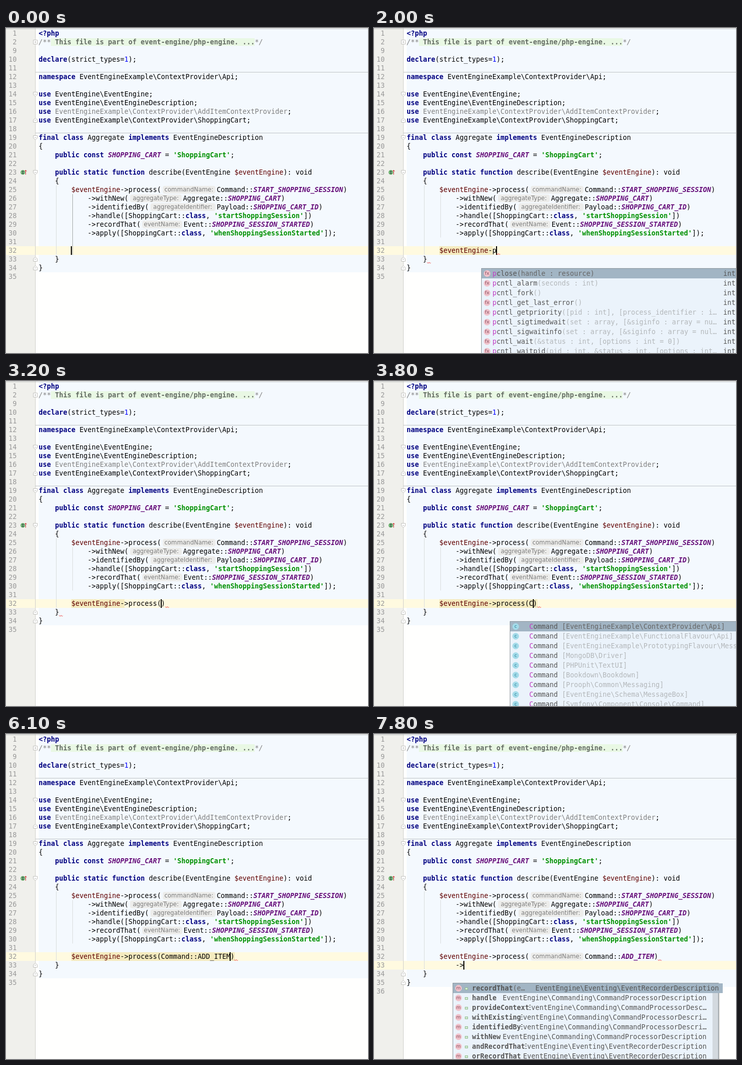
These frames come from a looping animation (709x636 px, 8000 ms). An HTML page:

```html
<!DOCTYPE html>
<html>
<head>
<meta charset="utf-8">
<style>
html, body { margin: 0; width: 100%; height: 100%; overflow: hidden; background: #fffffe; }
#stage { position: relative; width: 709px; height: 636px; overflow: hidden;
  font: 13.288px/17px "DejaVu Sans Mono", monospace; color: #000; white-space: pre; }
#stage div, #stage svg { position: absolute; }
#stage b { color: #000080; }
#stage i { color: #660e7a; font-weight: bold; }
#stage u { color: #600000; text-decoration: none; }
#stage s { color: #009000; font-weight: bold; text-decoration: none; }
#stage em { color: #808080; font-style: normal; }
#stage em.c { font-style: italic; }
#stage strong { color: #636b63; background: #e9f8e4; }
#stage kbd { display: inline-block; vertical-align: top; height: 15px; margin: 1px 3px 0;
  font: 11.6px/15px "DejaVu Sans", sans-serif; color: #7b7b7b; background: #ededeb;
  border-radius: 4px; text-align: center; }
.num { width: 21px; text-align: right; color: #999; }
.caret { position: absolute; top: 0; width: 2px; height: 17px; margin-left: -1px; background: #000; }
#stage .wave { top: 14px; overflow: visible; }
.popup { box-sizing: border-box; border: 1px solid #8d979e; background: #ebf3fb; color: #555;
  box-shadow: 1px 1px 2px #0005; }
.row { left: 0; height: 19px; background: #ebf3fb; }
.row.sel { background: #a2b5c4; }
.row span { position: absolute; top: 1px; line-height: 18px; }
.row .label { background: inherit; }
.row .bold { font-weight: bold; }
.row .args { position: static; color: #b3b7ba; font-weight: normal; }
.row.sel .args { color: #666; }
.row .hit { position: static; color: #c03fc4; }
.row .icon { left: 4px; top: 3px; width: 13px; height: 13px; border-radius: 50%;
  font: 9px/12px "DejaVu Sans", sans-serif; text-align: center; color: #87505f; background: #f1c2cb; }
.row .icon.c { color: #207d96; background: #a4dbe9; }
.row .lock { left: 23px; top: 8px; width: 4px; height: 3px; border: 1px solid #8fbc8f; background: #d5ead2; }
.bar { right: 0; top: 0; width: 11px; height: 100%; background: #d3d9de; }
</style>
</head>
<body>
<div id="stage"></div>
<script>
const stage = document.getElementById('stage');
const LOOP = 8000, LINE = 17;

const code = String.raw`<b>&lt;?php</b>
<em class="c">/**</em><strong> This file is part of event-engine/php-engine. ...</strong><em class="c">*/</em>

<b>declare</b>(strict_types=<span style="color:#00f">1</span>);

<b>namespace</b> EventEngineExample\ContextProvider\Api;

<b>use</b> EventEngine\EventEngine;
<b>use</b> EventEngine\EventEngineDescription;
<b>use</b> <em>EventEngineExample\ContextProvider\AddItemContextProvider</em>;
<b>use</b> EventEngineExample\ContextProvider\ShoppingCart;

<b>final class</b> Aggregate <b>implements</b> EventEngineDescription
{
    <b>public const</b> <i>SHOPPING_CART</i> = <s>'ShoppingCart'</s>;

    <b>public static function</b> describe(EventEngine <u>$eventEngine</u>): void
    {
        <u>$eventEngine</u>->process(<kbd style="width:103px">commandName:</kbd>Command::<i>START_SHOPPING_SESSION</i>)
            ->withNew(<kbd style="width:101px">aggregateType:</kbd>Aggregate::<i>SHOPPING_CART</i>)
            ->identifiedBy(<kbd style="width:127px">aggregateIdentifier:</kbd>Payload::<i>SHOPPING_CART_ID</i>)
            ->handle([ShoppingCart::<b>class</b>, <s>'startShoppingSession'</s>])
            ->recordThat(<kbd style="width:78px">eventName:</kbd>Event::<i>SHOPPING_SESSION_STARTED</i>)
            ->apply([ShoppingCart::<b>class</b>, <s>'whenShoppingSessionStarted'</s>]);
`.split('\n');

// Rows are name~arguments~type; a leading + adds the visibility mark.
const rows = text => text.trim().split('\n');
const commands = rows(String.raw`
Command~ [EventEngineExample\ContextProvider\Api]
Command~ [EventEngineExample\FunctionalFlavour\Api]
Command~ [EventEngineExample\PrototypingFlavour\Messaging]
Command~ [MongoDB\Driver]
Command~ [PHPUnit\TextUI]
Command~ [Bookdown\Bookdown]
Command~ [Prooph\Common\Messaging]
Command~ [EventEngine\Schema\MessageBox]
Command~ [Symfony\Component\Console\Command]`);

const lists = {
  vars: { x: 114, w: 520, end: 498, icon: 'v', bar: true, rows: rows(String.raw`
eventEngine~~EventEngine\EventEngine
_COOKIE~~array
_ENV~~array
_FILES~~array
_GET~~array
_POST~~array
_REQUEST~~array
_SERVER~~array
_SESSION~~array`) },
  funcs: { x: 210, w: 520, end: 498, icon: 'fx', rows: rows(`
pclose~(handle : resource)~int
pcntl_alarm~(seconds : int)~int
pcntl_fork~()~int
pcntl_get_last_error~()~int
pcntl_getpriority~([pid : int], [process_identifier : i…~int
pcntl_sigtimedwait~(set : array, [&siginfo : array = nu…~int
pcntl_sigwaitinfo~(set : array, [&siginfo : array = nul…~int
pcntl_wait~(&status : int, [options : int = 0])~int
pcntl_waitpid~(pid : int, &status : int, [options : int…~int`) },
  methods: { x: 218, w: 520, end: 490, icon: 'm', rows: rows(String.raw`
+process~~EventEngine\Commanding\CommandProcessorDescriptio
projectionInfo~()~EventEngine\Projecting\ProjectionInfoLis
preProcess~(commandName : string, p…~EventEngine\EventEngin
passToController~(commandName : str…~EventEngine\EventEngin
produce~~array|EventEngine\Messaging\CommandDispatchResult|
projectionVersion~(projectionName : string)~strin
+disableAutoProjecting~()~EventEngine\EventEngin
+runAllProjections~(sourceStream : string, ...events : ~voi
deleteAllProjections~()~voi`) },
  classes: { x: 266, w: 520, icon: 'c', text: 38, rows: commands },
  classesCom: { x: 266, w: 520, icon: 'c', text: 38, rows: ['COM', ...commands] },
  consts: { x: 338, w: 520, end: 370, icon: 'f', rows: rows(`
+class~~string
+START_SHOPPING_SESSION~~Command
+ADD_ITEM~~Command
+REMOVE_ITEM~~Command`) },
  chain: { x: 154, w: 521, end: 498, icon: 'm', text: 38, bar: true, rows: rows(String.raw`
+recordThat~(e…~EventEngine\Eventing\EventRecorderDescription
+handle~~EventEngine\Commanding\CommandProcessorDescription
+provideContext~~EventEngine\Commanding\CommandProcessorDesc…
+withExisting~~EventEngine\Commanding\CommandProcessorDescri…
+identifiedBy~~EventEngine\Commanding\CommandProcessorDescri…
+withNew~~EventEngine\Commanding\CommandProcessorDescription
+andRecordThat~~EventEngine\Eventing\EventRecorderDescription
+orRecordThat~~EventEngine\Eventing\EventRecorderDescription`) }
};

// time, typed text (| caret, ~ error wave), popup, prefix, selected row
const V = '$eventEngine', P = V + '->process(';
const HINTED = P + '<kbd style="width:103px">commandName:</kbd>Command::<i>ADD_ITEM</i>';
const steps = [
  [0, '|'], [400, ''], [600, '$|'],
  [800, '$|', 'vars', '', 0], [1000, '$|', 'vars', '', 0],
  [1200, V + '|'], [1500, V + '-|~'], [1900, V + '-p|~'],
  [2000, V + '-p|~', 'funcs', 'p', 0],
  [2300, V + '-|~'], [2500, V + '->|~'],
  [2600, V + '->p|~', 'methods', 'p', 0],
  [2800, V + '->pr|~', 'methods', 'pr', 0],
  [2900, V + '->pro|~', 'methods', 'pro', 0],
  [3000, V + '->proc|~', 'methods', 'proc', 0],
  [3200, P + '|)~'], [3400, P + '|)~'], [3700, P + 'C|)~'],
  [3800, P + 'C|)~', 'classes', 'c', 0],
  [3900, P + 'Co|)~', 'classes', 'co', 0],
  [4100, P + 'Com|)~', 'classes', 'com', 0],
  [4300, P + 'Com|)~', 'classesCom', 'com', 0],
  [4900, P + 'Com)~', 'classesCom', 'com', 1],
  [5000, P + 'Com|)~'],
  [5200, P + 'Command::|)~', 'consts', '', 0],
  [5800, P + 'Command::|)~', 'consts', '', 1],
  [5900, P + 'Command::|)~', 'consts', '', 2],
  [6100, P + 'Command::ADD_ITEM|)~'],
  [6300, HINTED + '|)~'], [6500, HINTED + ')|~'],
  [6600, '|'], [7100, '-|'],
  [7300, '->|', 'chain', '', 0], [7600, '->|', 'chain', '', 0], [7800, '->|', 'chain', '', 0]
];

const box = (x, y, w, h, color) =>
  `<div style="left:${x}px;top:${y}px;width:${w}px;height:${h}px;background:${color}"></div>`;
const rowY = i => 2 + LINE * i;
const line = (i, html) => `<div style="left:64px;top:${rowY(i)}px">${html}</div>`;
const WAVE = '<svg class="wave" width="8" height="3"><path d="M0 .5l2 2 2-2 2 2 1-1" fill="none" stroke="#e33"/></svg>';
const marks = s => s.replace(V, '<u>$&</u>').replace('|', '<span class="caret"></span>').replace('~', WAVE);

function foldMark(i, kind) {
  const y = rowY(i) + 8.5;
  const d = kind ? `M53.5 ${y - 4 * kind}h8v${5 * kind}l-4 ${3 * kind}l-4 ${-3 * kind}z`
                 : `M53.5 ${y - 4}h8v8h-8z`;
  const sign = kind < 0 || kind > 0 ? `M55.5 ${y}h4` : `M55.5 ${y}h4m-2-2v4`;
  return `<path d="${d}" fill="#fff"/><path d="${sign}"/>`;
}

function gutterArt(shift) {
  const folds = [[1, 0], [7, 1], [10, -1], [12, 1], [16, 1], [26 + shift, -1], [27 + shift, -1]];
  return `<svg width="64" height="636" fill="none" stroke="#c2c2be">
    ${folds.map(f => foldMark(...f)).join('')}
    <circle cx="33" cy="282.5" r="4" fill="#7fbf7f" stroke="#4f9a55"/>
    <path d="M31.5 280.5h3m-1.5 0v4m-1.5 0h3" stroke="#234"/>
    <path d="M38.5 287v-9m-2 2.5l2-2.5 2 2.5" stroke="#c33"/></svg>`;
}

function labelHtml(name, prefix) {
  const at = name.toLowerCase().indexOf(prefix), end = at + prefix.length;
  return name.slice(0, at) + `<span class="hit">${name.slice(at, end)}</span>` + name.slice(end);
}

function popupHtml(t, key, prefix, sel) {
  const p = lists[key], chain = key == 'chain';
  const shown = p.rows.filter(r => r.split('~')[0].toLowerCase().includes(prefix));
  const items = shown.map((r, i) => {
    const lock = r[0] == '+', on = i == sel, wide = chain && on && t >= 7800;
    const [name, args = '', type = ''] = r.slice(lock).split('~');
    const left = p.text || (lock ? 38 : 22);
    const typeX = p.end - type.length * 8 + (wide ? 24 : 0);
    const width = wide ? 528 : p.w - 2 - (p.bar ? 11 : 0);
    return `<div class="row ${on ? 'sel' : ''}" style="top:${i * 19}px;width:${width}px;z-index:${wide ? 1 : 0}">
<span class="icon ${p.icon}">${p.icon}</span>${lock && (!chain || t >= 7600) ? '<span class="lock"></span>' : ''}
<span style="left:${typeX - 1}px">${type}</span>
<span class="label ${p.icon == 'm' ? 'bold' : ''}" style="left:${left - 1}px">${labelHtml(name, prefix)}<span class="args">${args}</span></span>
</div>`.replace(/\n/g, '');
  }).join('');
  return `<div class="popup" style="left:${p.x}px;top:${chain ? 487 : 470}px;width:${p.w}px;height:${shown.length * 19 + 2}px">
${p.bar ? '<div class="bar"></div>' : ''}${items}</div>`.replace(/\n/g, '');
}

function guides(t, shift) {
  const light = '#d9dddd', dark = '#a3a8a8';
  const split = t < 600 ? 444 : t < 1000 ? 393 : 325;
  return box(98, 308, 1, 136 + LINE * shift, light) +
    box(130, 325, 1, split - 325, dark) +
    (split < 410 ? box(130, split, 1, 410 - split, light) : '');
}

function highlight(t, typed) {
  if (t < 1500 || t >= 6500) return '';
  const chars = t < 3400 ? 13 : t < 6300 ? typed.replace(/[|~]/g, '').length : 53.6;
  return box(128, 427, chars * 8, LINE, '#f5ebbf');
}

function render([t, typed, list, prefix, sel]) {
  const shift = t >= 6600 ? 1 : 0, count = 29 + shift;
  const numbers = Array.from({ length: count }, (_, i) =>
    `<div class="num" style="top:${rowY(i)}px">${i < 2 ? i + 1 : i + 7}</div>`).join('');
  const tail = shift
    ? [' '.repeat(8) + marks(HINTED + ')~'), ' '.repeat(12) + marks(typed)]
    : [' '.repeat(8) + marks(typed)];
  tail.push('    }' + (t >= 1500 && t < 3400 ? WAVE : ''), '}');
  stage.innerHTML =
    box(0, 0, 57, 636, '#f0f0ec') +
    box(64, 2, 645, 476 + LINE * shift, '#f4f9fe') +
    box(0, rowY(25 + shift), 709, LINE, '#fffae0') +
    box(57, 0, 1, 636, '#d0d0cc') +
    box(0, 1, 709, 1, '#b5b8b8') +
    box(58, 86, 651, 1, '#bfc3c5') + box(58, 205, 651, 1, '#bfc3c5') +
    guides(t, shift) + highlight(t, typed) + numbers + gutterArt(shift) +
    [...code.slice(0, 25), ...tail].map((html, i) => line(i, html)).join('') +
    (list ? popupHtml(t, list, prefix, sel) : '');
}

let current;
function tick(now) {
  const t = now % LOOP;
  const step = steps.findLast(s => s[0] <= t) || steps[0];
  if (step != current) render(current = step);
  requestAnimationFrame(tick);
}
render(current = steps[0]);
requestAnimationFrame(tick);
</script>
</body>
</html>
```
